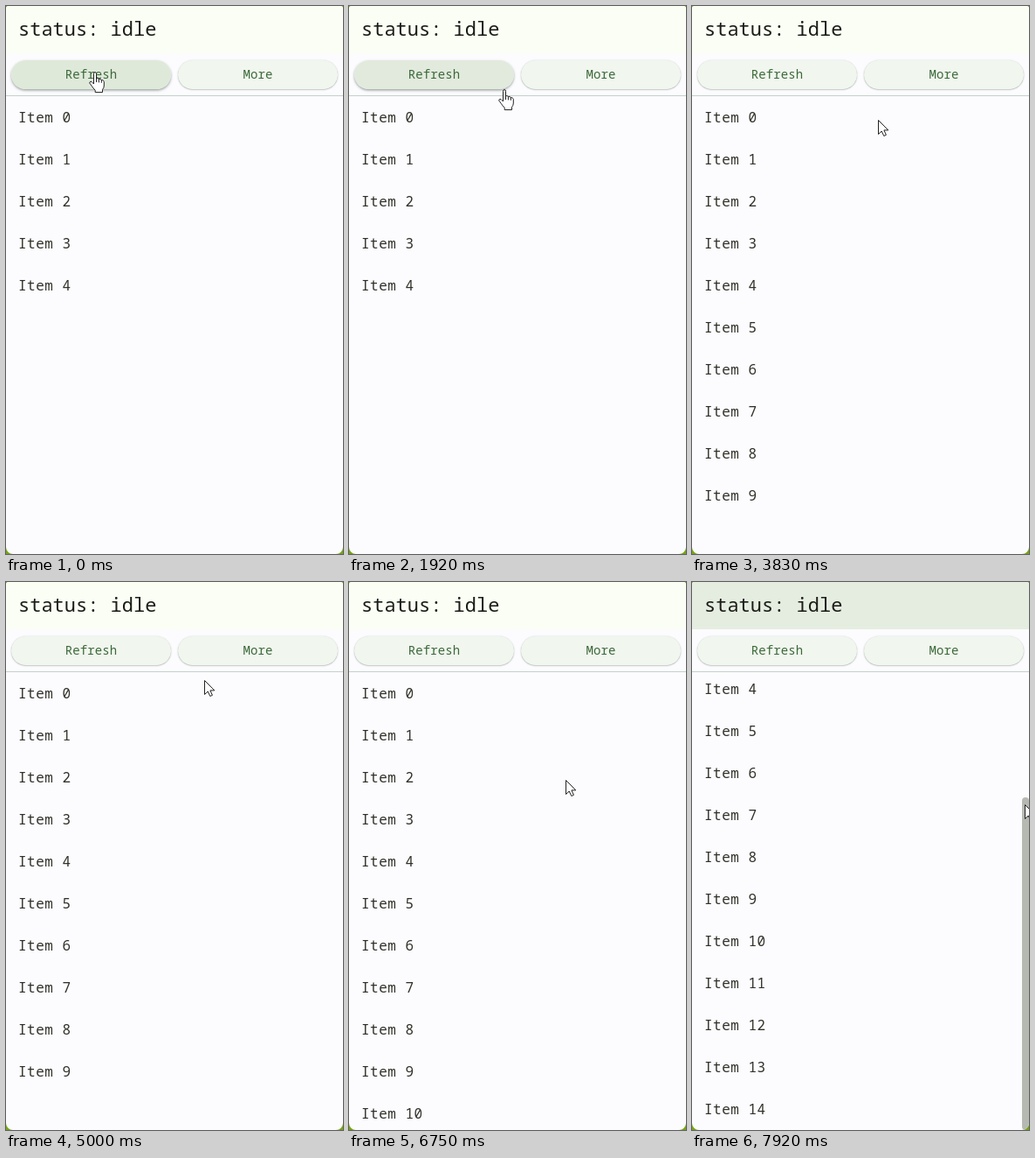
An HTML page with a canvas for the animation above (8000 ms loop, 386 by 626 pixels).

```html
<!DOCTYPE html>
<html lang="en">
<head>
<meta charset="utf-8">
<title>Refreshable list</title>
<style>
  html, body { margin: 0; width: 100%; height: 100%; overflow: hidden; }
  canvas { display: block; }
</style>
</head>
<body>
<canvas id="stage" width="386" height="626"></canvas>
<script>
const ctx = document.getElementById('stage').getContext('2d');
const W = 386, H = 626, LOOP = 8000, STEP = 1000 / 12;
const LIST_TOP = 103, ROW = 48;
const MONO = '"Noto Sans Mono", "DejaVu Sans Mono", monospace';

const clamp = v => Math.max(0, Math.min(1, v));
const progress = (t, start, length) => clamp((t - start) / length);
const mix = (a, b, p) => a + (b - a) * p;
const smooth = p => p * p * (3 - 2 * p);
const easeOut = p => 1 - (1 - p) ** 3;

const buttons = [
  { label: 'Refresh', x: 6 },
  { label: 'More', x: 197 }
];
const BTN = { y: 62, w: 183, h: 33 };

const clicks = [
  { button: 0, press: 530, release: 580, x: 102, y: 76 },
  { button: 1, press: 2735, release: 2800, x: 251, y: 82 },
  { button: 1, press: 5240, release: 5300, x: 267, y: 73 }
];

// Pointer hot spot: time, x, y, linear
const pointerPath = [
  [700, 102, 76], [1000, 126, 94, 1], [1200, 141, 103, 1],
  [1760, 141, 103], [2160, 251, 82],
  [3350, 251, 82], [3830, 214, 129, 1], [4160, 114, 224, 1],
  [4600, 114, 224], [5200, 267, 73],
  [6100, 267, 73], [6740, 248, 226],
  [7350, 248, 226], [7740, 381, 254]
];

function pointerAt(t) {
  let prev = pointerPath[0];
  for (const key of pointerPath) {
    if (t <= key[0]) {
      if (key === prev) break;
      let p = progress(t, prev[0], key[0] - prev[0]);
      if (!key[3]) p = smooth(p);
      return { x: mix(prev[1], key[1], p), y: mix(prev[2], key[2], p) };
    }
    prev = key;
  }
  return { x: prev[1], y: prev[2] };
}

const over = (b, p) => p.x >= b.x && p.x <= b.x + BTN.w && p.y > 55 && p.y < 101;

function hoverAmount(b, t) {
  let sum = 0;
  for (let i = 0; i < 6; i++) sum += over(b, pointerAt(t - i * 20));
  return sum / 6;
}

function text(str, x, y, size, color, { spacing = 0, weight = 400, align = 'left' } = {}) {
  ctx.font = `${weight} ${size}px ${MONO}`;
  ctx.letterSpacing = spacing + 'px';
  ctx.textAlign = align;
  ctx.fillStyle = color;
  ctx.fillText(str, x, y);
}

function tint(color, alpha, paint) {
  ctx.globalAlpha = alpha;
  ctx.fillStyle = color;
  paint();
  ctx.globalAlpha = 1;
}

function drawRipple(click, b, t) {
  if (t < click.press || t > click.release + 375) return;
  const grow = easeOut(progress(t, click.press, 225));
  const alpha = Math.min(progress(t, click.press, 15), 1 - progress(t, click.release, 375));
  const x = mix(click.x, b.x + BTN.w / 2, grow);
  const y = mix(click.y, BTN.y + BTN.h / 2, grow);
  tint('#4f6a3c', alpha * 0.12, () => {
    ctx.beginPath();
    ctx.arc(x, y, mix(28, 98, grow), 0, Math.PI * 2);
    ctx.fill();
  });
}

function drawButton(b, index, t) {
  const hover = hoverAmount(b, t);
  const pill = new Path2D();
  pill.roundRect(b.x, BTN.y, BTN.w, BTN.h, BTN.h / 2);

  ctx.save();
  ctx.shadowColor = 'rgba(60, 75, 65, 0.5)';
  ctx.shadowBlur = mix(1.5, 3, hover);
  ctx.shadowOffsetY = mix(0.6, 1.6, hover);
  ctx.fillStyle = '#f1f6ee';
  ctx.fill(pill);
  ctx.restore();

  ctx.save();
  ctx.clip(pill);
  tint('#dfe9da', hover, () => ctx.fill(pill));
  for (const c of clicks) if (c.button === index) drawRipple(c, b, t);
  ctx.restore();

  text(b.label, b.x + BTN.w / 2, 83, 14, '#3c693a',
    { spacing: 0.1, weight: 500, align: 'center' });
}

function drawList(t, scroll) {
  if (t >= 580 && t < 1580) return;
  const count = t < 3800 ? 5 : t < 6300 ? 10 : 15;
  ctx.save();
  ctx.beginPath();
  ctx.rect(0, LIST_TOP, W, H - LIST_TOP);
  ctx.clip();
  for (let i = 0; i < count; i++) {
    text('Item ' + i, 14, 133 + i * ROW - scroll, 16, '#32322a', { spacing: 0.5 });
  }
  ctx.restore();
}

function drawScrollbar(t, scroll) {
  const view = H - LIST_TOP, content = 15 * ROW;
  const top = LIST_TOP + scroll * view / content;
  const alpha = progress(t, 6960, 200) * mix(0.55, 1, progress(t, 7680, 230));
  tint('#b6b9b1', alpha, () => {
    ctx.beginPath();
    ctx.roundRect(378, top, 8, view * view / content, 4);
    ctx.fill();
  });
}

const arrow = new Path2D('M.5 .5V16.5L4.2 13L6.8 18.5L9.4 17.3L6.9 11.9H11.8Z');
const hand = new Path2D(
  'M5.5 14V2.3Q5.5 .6 7 .6T8.5 2.3V8.3Q9 7.4 10.2 7.6T11.4 9' +
  'Q12 8.2 13.1 8.5T14.3 10Q15 9.3 16 9.8T17.3 11.7V16' +
  'Q17.3 18.5 15.5 20.5V23.6H7.2V21.2Q4.8 19 3.2 16.3L.9 13.2' +
  'Q.4 11.8 1.8 11.4T4 12.5Z');
const knuckles = new Path2D('M8.5 8V12M11.4 9V12.4M14.3 10V12.8');

function drawPointer(t) {
  const p = pointerAt(t);
  const pointing = buttons.some(b => over(b, p));
  ctx.save();
  ctx.translate(Math.round(p.x) - (pointing ? 7 : 0), Math.round(p.y) - (pointing ? 1 : 0));
  ctx.fillStyle = '#fff';
  ctx.strokeStyle = '#222';
  ctx.lineJoin = 'round';
  const shape = pointing ? hand : arrow;
  ctx.fill(shape);
  ctx.stroke(shape);
  if (pointing) ctx.stroke(knuckles);
  ctx.restore();
}

function draw(t) {
  const scroll = 197 * smooth(progress(t, 6940, 560));
  const pending = clicks.some(c => t >= c.release && t < c.release + 1000);

  ctx.fillStyle = '#74a412';
  ctx.fillRect(0, 0, W, H);
  ctx.save();
  ctx.beginPath();
  ctx.roundRect(0, 0, W, H, [3, 3, 8, 8]);
  ctx.clip();
  ctx.fillStyle = '#fcfcff';
  ctx.fillRect(0, 0, W, H);

  const bar = () => ctx.fillRect(0, 0, W, 54);
  tint('#fafef4', 1, bar);
  tint('#e5ede0', progress(t, 6950, 200), bar);
  text('status: ' + (pending ? 'pending' : 'idle'), 14, 34, 22, '#1c1c18');

  buttons.forEach((b, i) => drawButton(b, i, t));
  ctx.fillStyle = '#c3d1cc';
  ctx.fillRect(0, 102, W, 1);

  drawList(t, scroll);
  drawScrollbar(t, scroll);
  drawPointer(t);
  ctx.restore();
}

function frame() {
  const t = performance.now() % LOOP;
  draw(Math.floor((t + 4) / STEP) * STEP % LOOP);
  requestAnimationFrame(frame);
}
frame();
</script>
</body>
</html>
```
